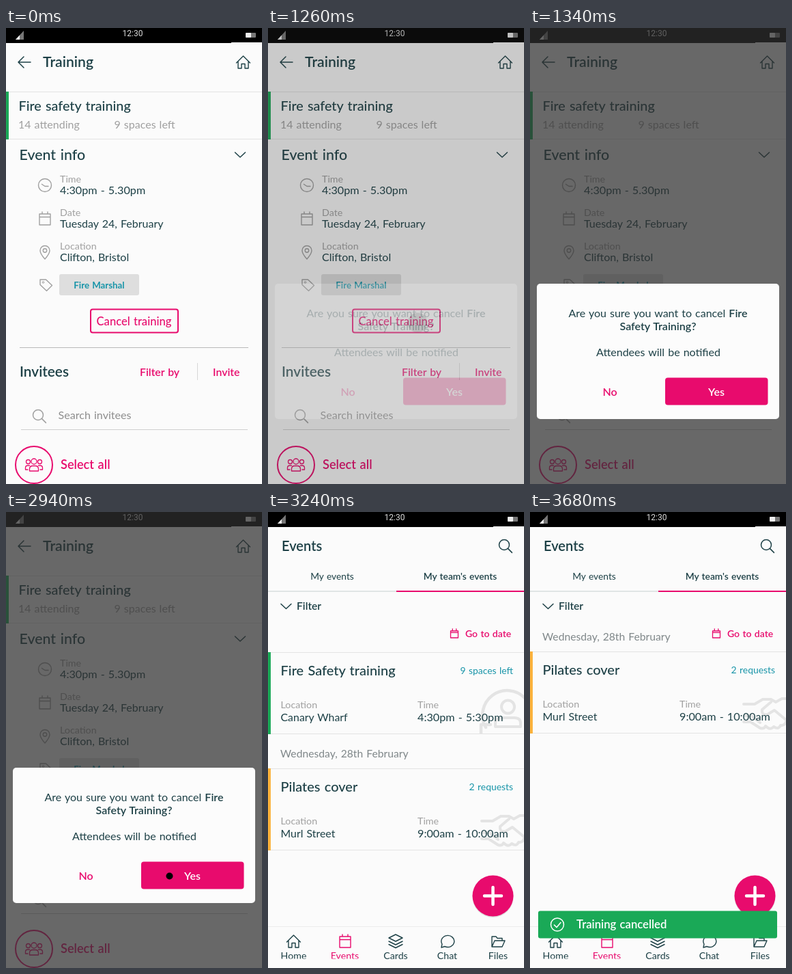
Recreate the animation shown at these times as an HTML page. Size 375 by 667 pixels, loop 5 s.

```html
<!DOCTYPE html>
<html lang="en">
<head>
<meta charset="utf-8">
<title>Cancel training</title>
<style>
  html, body { margin: 0; width: 100%; height: 100%; overflow: hidden; background: #fbfbfb; }
  svg { display: block; width: 375px; height: 667px; }
  text { font-family: Lato, "Open Sans", sans-serif; word-spacing: .06em; white-space: pre; }
  .line { fill: none; stroke-linecap: round; stroke-linejoin: round; }
</style>
</head>
<body>
<svg id="stage" viewBox="0 0 375 667" xmlns="http://www.w3.org/2000/svg"></svg>
<script>
const LOOP = 5000;
const INK = '#1d4046', GREY = '#a0a0a0', PINK = '#e80b6d', GREEN = '#1aa957',
      TEAL = '#1794a8', ORANGE = '#fbb23c', PAPER = '#fbfbfb', RULE = '#e3e3e3', GHOST = '#e4e4e4';

const text = (x, y, size, str, fill = INK, weight = 400, anchor = 'start') =>
  `<text x="${x}" y="${y}" font-size="${size}" fill="${fill}" font-weight="${weight}" text-anchor="${anchor}">${str}</text>`;
const rect = (x, y, w, h, fill, r = 0, extra = '') =>
  `<rect x="${x}" y="${y}" width="${w}" height="${h}" rx="${r}" fill="${fill}" ${extra}/>`;
const path = (d, stroke = INK, width = 1.5) =>
  `<path class="line" d="${d}" stroke="${stroke}" stroke-width="${width}"/>`;
const ring = (x, y, r, stroke, width = 1.4) =>
  `<circle cx="${x}" cy="${y}" r="${r}" fill="none" stroke="${stroke}" stroke-width="${width}"/>`;
const group = (id, body) => `<g id="${id}">${body}</g>`;

const calendar = (x, y, w, h, stroke, width) =>
  path(`M${x} ${y + 2}h${w}v${h - 2}h${-w}zM${x} ${y + h * .36}h${w}M${x + w * .25} ${y - 1}v3M${x + w * .75} ${y - 1}v3`, stroke, width);
const house = (x, y, s, width) =>
  path(`M${x - s} ${y + 1}L${x} ${y - s + 1}L${x + s} ${y + 1}M${x - s * .75} ${y - 1}v${s}h${s * .5}v${-s * .65}h${s * .5}v${s * .65}h${s * .5}v${-s}`, INK, width);
const magnifier = (x, y, r, stroke) =>
  ring(x, y, r, stroke, 1.5) + path(`M${x + r * .72} ${y + r * .72}l6 6`, stroke);

const people = ring(41, 634, 4, PINK, 1.3) + ring(32.5, 634.5, 3, PINK, 1.3) + ring(49.5, 634.5, 3, PINK, 1.3)
  + path('M34.5 648V645Q34.5 640.5 39 640.5H43Q47.5 640.5 47.5 645V648Z', PINK, 1.3)
  + path('M34.5 640H32Q28.5 640 28.5 643.5V646H32M47.5 640H50Q53.5 640 53.5 643.5V646H50', PINK, 1.3);

const statusBar = rect(0, 0, 375, 22, '#000') + rect(330, 21, 45, 1, PAPER)
  + '<path d="M14 17L26 4V17Z" fill="#777"/><path d="M14 17L20 10.5V17Z" fill="#eee"/>'
  + rect(351, 7, 15, 7, '#777', 1) + rect(351, 7, 8, 7, '#eee', 1)
  + `<text x="185.5" y="11.5" font-size="12" fill="#ddd" text-anchor="middle" style="font-family:Roboto,sans-serif">12:30</text>`;

const trainingScreen = rect(0, 0, 375, 667, PAPER) + statusBar
  + path('M36 50H18M26 42L18 50L26 58')
  + text(54, 57, 21.2, 'Training', INK, 600)
  + house(347.5, 50, 10, 1.4)
  + rect(0, 93, 375, 1, RULE) + rect(0, 162, 375, 1, RULE) + rect(0, 93, 4, 70, GREEN)
  + text(18.5, 121, 19.8, 'Fire safety training', INK, 500)
  + text(18, 147, 16, '14 attending', GREY) + text(158.5, 147, 16, '9 spaces left', GREY)
  + text(19.5, 193, 21.4, 'Event info', INK, 500)
  + path('M335.5 182L343 189L350.5 182')
  + ring(57, 230, 9.5, GREY) + path('M52.5 228.5L57 231.5H62', GREY, 1.4)
  + text(79, 226, 14.3, 'Time', GREY) + text(79, 243, 16.2, '4:30pm - 5.30pm')
  + calendar(49, 270, 16, 18, GREY, 1.4)
  + text(79, 275, 14.3, 'Date', GREY) + text(79, 292, 16, 'Tuesday 24, February')
  + path('M57 338Q50 330 50 325.5a7 7 0 0 1 14 0Q64 330 57 338Z', GREY, 1.4) + ring(57, 325.5, 2.7, GREY)
  + text(79, 324, 14.3, 'Location', GREY) + text(79, 341, 16, 'Clifton, Bristol')
  + path('M50 368h8.5L67.5 376.5L59.5 384.5L50 375.5Z', GREY, 1.4) + ring(54.5, 372, 1.3, GREY, 1)
  + rect(78, 360, 117, 31, '#dedede', 3)
  + text(136.5, 380.5, 13.3, 'Fire Marshal', TEAL, 700, 'middle')
  + rect(124, 411.5, 128, 34, PAPER, 3, `stroke="${PINK}" stroke-width="2"`)
  + text(187.5, 435, 16.6, 'Cancel training', PINK, 500, 'middle')
  + rect(20, 467, 335, 1, '#b9b9b9')
  + text(20, 510, 20.8, 'Invitees', INK, 600)
  + text(196, 509, 15.8, 'Filter by', PINK, 600) + text(303, 509, 15.8, 'Invite', PINK, 600)
  + rect(280, 490, 1, 25, '#d6d6d6')
  + magnifier(47, 566, 7.5, GREY)
  + text(76.5, 572, 16.1, 'Search invitees', '#8d8d8d')
  + rect(22, 587, 332, 1, '#cfcfcf')
  + ring(41, 639, 27, PINK, 2) + people
  + text(80, 645, 18.2, 'Select all', PINK, 600);

const dialog = rect(10, 374, 355, 198, '#fcfcfc', 5)
  + text(187.5, 423, 16, 'Are you sure you want to cancel <tspan font-weight="600">Fire</tspan>', INK, 400, 'middle')
  + text(187.5, 442, 16, 'Safety Training?', INK, 600, 'middle')
  + text(188, 480, 16, 'Attendees will be notified', INK, 400, 'middle')
  + text(117, 538, 16, 'No', PINK, 600, 'middle')
  + rect(198, 511.5, 150.5, 40, PINK, 4)
  + text(273, 538, 16, 'Yes', '#fff', 600, 'middle');

function eventCard(y, color, title, note, place, hours, mark) {
  return rect(0, y, 375, 120, PAPER) + mark
    + rect(0, y, 375, 1, RULE) + rect(0, y + 119, 375, 1, RULE) + rect(0, y, 4, 120, color)
    + text(18.5, y + 34, 20, title, INK, 500)
    + text(359, y + 32, 13.9, note, TEAL, 400, 'end')
    + text(18.5, y + 82, 14.3, 'Location', GREY) + text(18.5, y + 101, 15.9, place)
    + text(219, y + 82, 14.3, 'Time', GREY) + text(219, y + 101, 16.2, hours);
}

const personMark = '<g clip-path="url(#cardClip)">'
  + path('M319 315A36 36 0 1 1 378 320M312 326V311H326', GHOST, 4.5)
  + ring(351.5, 285, 9.5, GHOST, 4)
  + path('M333 314V309Q333 301 342 301H361Q370 301 370 309V314Z', GHOST, 4) + '</g>';
const handsMark = path('M313 452H329L341 445H353L360 449L369 444H378M353 449L340 460Q339 469 348 467L358 461L375 475', GHOST, 4)
  + path('M313 478H323L337 487Q343 489 345 484Q352 491 357 485Q364 490 367 483Q373 484 375 478M324 469L337 479M315 469H324', GHOST, 4);

const tabs = [['Home', 37.5], ['Events', 112.5], ['Cards', 187], ['Chat', 262.5], ['Files', 337]];
const tabBar = rect(0, 606, 375, 61, PAPER) + rect(0, 606, 375, 1, '#ececec')
  + house(37.5, 628, 10, 1.4)
  + calendar(105, 619, 16, 18, PINK, 1.4)
  + path('M187 618L197 623L187 628L177 623ZM177 628L187 633L197 628M177 632.5L187 637.5L197 632.5', INK, 1.4)
  + path('M254 637L255 632A9.5 8.5 0 1 1 259 635.5Z', INK, 1.4)
  + path('M328 636V621H334L336 623.5H343V627M328 636L332 627H347L343 636Z', INK, 1.4)
  + tabs.map(([name, x], i) => text(x, 654, 14.2, name, i === 1 ? PINK : INK, 400, 'middle')).join('')
  + rect(0, 653.5, 150, 5, PAPER);

const eventsScreen = rect(0, 0, 375, 667, PAPER) + statusBar
  + text(20, 57, 20.1, 'Events', INK, 600)
  + magnifier(346, 48, 7.5, INK)
  + text(94, 99, 13.8, 'My events', INK, 400, 'middle')
  + text(281.5, 99, 13.8, "My team's events", INK, 600, 'middle')
  + rect(0, 115, 188, 2, '#e0e5e5') + rect(188, 115, 187, 2, PINK)
  + path('M19 134.5L26.5 141.5L34 134.5')
  + text(42, 143, 15.6, 'Filter', INK, 600)
  + group('cancelledCard', eventCard(205, GREEN, 'Fire Safety training', '9 spaces left', 'Canary Wharf', '4:30pm - 5:30pm', personMark))
  + group('remaining', text(18, 359, 15.7, 'Wednesday, 28th February', '#7f8789')
      + eventCard(375, ORANGE, 'Pilates cover', '2 requests', 'Murl Street', '9:00am - 10:00am', handsMark))
  + calendar(267.5, 172, 11, 12, PINK, 1.3)
  + text(289, 183, 14, 'Go to date', PINK, 600)
  + '<circle cx="329.5" cy="563" r="30" fill="#000" opacity=".12"/>'
  + `<circle cx="329.5" cy="561.5" r="30" fill="${PINK}"/>`
  + path('M317 561.5H342M329.5 549V574', '#fff', 4.5)
  + tabBar
  + group('toast', rect(12, 583.5, 350, 40, GREEN, 3)
      + ring(40, 603.5, 9.5, '#fff', 1.5) + path('M35.5 604L39 607.5L45 600.5', '#fff', 1.6)
      + text(68, 609, 16.7, 'Training cancelled', '#fff', 600));

const stage = document.getElementById('stage');
stage.innerHTML = '<defs><clipPath id="cardClip"><rect x="0" y="205" width="375" height="119"/></clipPath></defs>'
  + trainingScreen
  + '<circle id="firstTap" cx="219" cy="431"/>'
  + rect(0, 0, 375, 667, '#303030', 0, 'id="shade"')
  + group('dialog', dialog)
  + '<circle id="secondTap" cx="239.5" cy="532.5"/>'
  + group('events', eventsScreen);

const el = id => document.getElementById(id);
const progress = (t, from, to) => Math.min(1, Math.max(0, (t - from) / (to - from)));
const easeIn = (p, power = 1.6) => p ** power;
const easeInOut = p => p * p * (3 - 2 * p);

function fade(id, opacity) {
  el(id).setAttribute('opacity', opacity);
  el(id).setAttribute('visibility', opacity > 0 ? 'visible' : 'hidden');
}

function ripple(id, t, start) {
  const p = progress(t, start, start + 280);
  el(id).setAttribute('r', 5 + 11 * p);
  fade(id, t < start ? 0 : 1 - p);
}

function render(t) {
  ripple('firstTap', t, 1020);
  ripple('secondTap', t, 2940);
  const open = progress(t, 1180, 1340);
  fade('shade', .72 * easeIn(open));
  fade('dialog', easeIn(open, 2.3));
  fade('events', easeIn(progress(t, 3080, 3240)));
  fade('toast', easeInOut(progress(t, 3240, 3460)));
  const collapse = easeInOut(progress(t, 3460, 3680));
  fade('cancelledCard', 1 - collapse);
  el('remaining').setAttribute('transform', `translate(0 ${-171 * collapse})`);
}

const began = performance.now();
function tick() {
  // Hold each pose for 20 ms.
  render(Math.floor(((performance.now() - began) % LOOP) / 20) * 20);
  requestAnimationFrame(tick);
}
tick();
</script>
</body>
</html>
```
